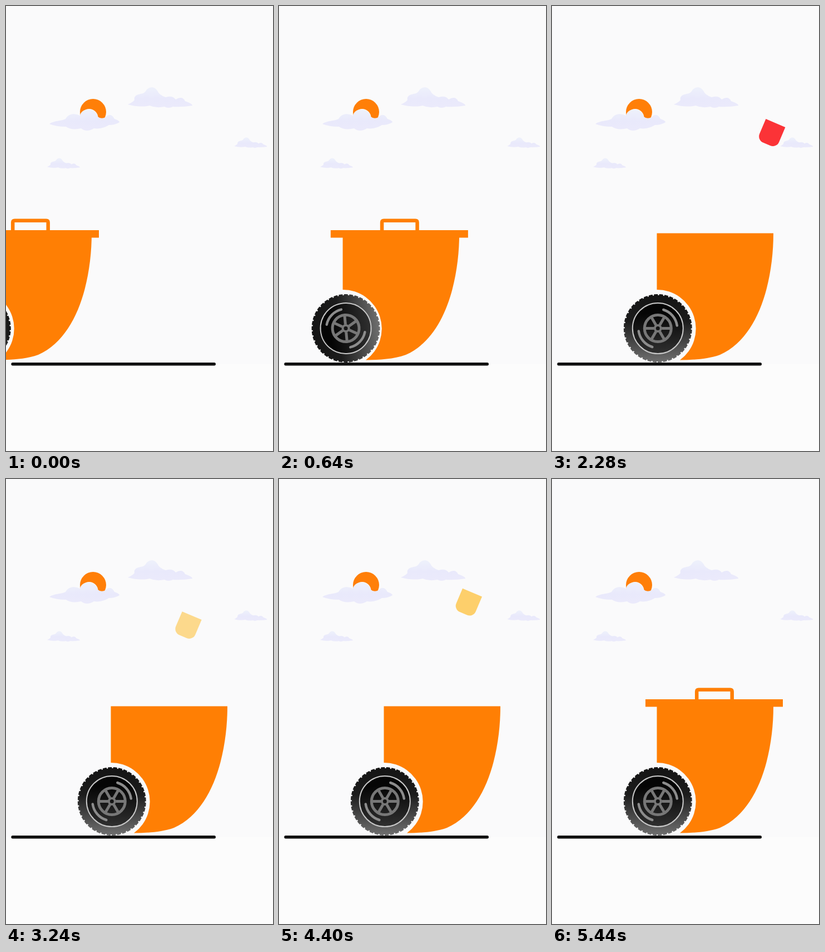
These frames come from a looping animation (480 by 800 pixels, 5.96 s). An HTML page:

```html
<!DOCTYPE html>
<html lang="en">
<head>
<meta charset="utf-8">
<title>Bin</title>
<style>
html, body { margin: 0; width: 100%; height: 100%; overflow: hidden; background: #fafafb; }
svg { display: block; width: 100%; height: 100%; }
</style>
</head>
<body>
<svg viewBox="0 0 480 800">
  <defs>
    <linearGradient id="mist" x2="0" y2="1">
      <stop offset="0" stop-color="#eef1fb"/>
      <stop offset=".55" stop-color="#e9e9fb"/>
      <stop offset="1" stop-color="#ebeafb"/>
    </linearGradient>
    <linearGradient id="tyre" x2="0" y2="1">
      <stop offset="0" stop-color="#141414"/>
      <stop offset=".4" stop-color="#1c1c1c"/>
      <stop offset="1" stop-color="#707070"/>
    </linearGradient>
    <linearGradient id="disc" x2="0" y2="1">
      <stop offset=".2" stop-color="#050505"/>
      <stop offset="1" stop-color="#303030"/>
    </linearGradient>
    <path id="cloud" fill="url(#mist)" d="M219 177Q228 173 231 169Q229 160 242 158Q250 157 253 150Q264 141 272 152Q275 160 287 164Q299 160 305 168Q317 161 322 171Q336 176 335 179Q318 182 300 181Q292 185 285 181Q270 184 258 179Q240 183 219 177Z"/>
    <path id="scrap" d="M-19-19H19V10A12 12 0 0 1 7 22H-7A12 12 0 0 1-19 10Z"/>
    <path id="spoke" d="M7 0H24"/>
  </defs>

  <rect width="480" height="800" fill="#fafafb"/>
  <rect y="644" width="480" height="156" fill="#fcfcfc"/>

  <circle cx="156.5" cy="190.5" r="23.5" fill="#ff7f08"/>
  <circle cx="149.500" cy="201" r="16" fill="#f8f9fb"/>
  <path fill="url(#mist)" d="M78 212C85 206 100 207 107 203C113 192 125 193 133 197C136 182 160 182 165 199Q171 204 179 200Q188 190 195 203Q204 206 204 209Q196 214 185 214Q172 222 158 220Q145 228 135 220Q118 224 108 217Q90 217 78 212Z"/>
  <use href="#cloud"/>
  <use href="#cloud" transform="translate(-37.300 199.300) scale(.508)"/>
  <use href="#cloud" transform="translate(299 162) scale(.508)"/>

  <g id="scraps"></g>

  <path id="body" fill="#ff7f04" d="M188.500 408.500H398C398 490 374 595 302 627C280 635 255 636 230 636.500A70 70 0 0 0 188.500 510Z"/>

  <g id="wheel" fill="none">
    <circle r="61.500" fill="url(#tyre)"/>
    <circle r="61" stroke="#fafafb" stroke-width="3" pathLength="40" stroke-dasharray=".25 .75"/>
    <circle r="45.500" fill="url(#disc)" stroke="#c8c8c8" stroke-width="2"/>
    <g stroke="#8c8c8c" stroke-width="4.500" stroke-linecap="round">
      <path id="shine" d="M10-33.500A35 35 0 0 1 34.500-5"/>
      <use href="#shine" transform="rotate(180)"/>
    </g>
    <g id="spokes" stroke="#777" stroke-width="5">
      <circle r="24"/>
      <circle r="5.500" stroke-width="4"/>
    </g>
  </g>

  <g id="lid" fill="#ff7f04">
    <rect x="168" y="396" width="247" height="13.500"/>
    <path d="M260.200 397V382Q260.200 378.700 263.500 378.700H320.500Q323.700 378.700 323.700 382V397" fill="none" stroke="#ff7f04" stroke-width="6.500"/>
  </g>

  <path d="M12 643.800H374.300" stroke="#111" stroke-width="5.500" stroke-linecap="round"/>
</svg>
<script>
const LOOP = 5960, STEP = 40;
const ORANGE = '#ff7f04', FADED = '#fc8250';
const NS = 'http://www.w3.org/2000/svg';
const byId = id => document.getElementById(id);
const [body, wheel, lid] = ['body', 'wheel', 'lid'].map(byId);
const [rim, handle] = lid.children;

function addUse(parent, href, attrs) {
  const el = document.createElementNS(NS, 'use');
  el.setAttribute('href', href);
  for (const key in attrs) el.setAttribute(key, attrs[key]);
  return parent.appendChild(el);
}

for (let a = 0; a < 360; a += 60) addUse(byId('spokes'), '#spoke', { transform: `rotate(${a})` });

const scraps = [
  { start: 2280, x: 394.5, y: 228, dx: -72, dy: 170, power: 2, fill: '#fb3337' },
  { start: 2960, x: 350, y: 188, dx: -65, dy: 210, power: 1.35, fill: '#fec850' },
  { start: 3560, x: 350, y: 180, dx: -95, dy: 215, power: 2, fill: '#fec850' },
  { start: 4160, x: 350, y: 188, dx: -62, dy: 210, power: 2, fill: '#fec850' }
].map(s => ({ ...s, el: addUse(byId('scraps'), '#scrap', { fill: s.fill }) }));

const progress = (t, start, length) => Math.min(1, Math.max(0, (t - start) / length));

function drawLid(x, y, opacity, color) {
  lid.setAttribute('transform', `translate(${x} ${y})`);
  lid.setAttribute('opacity', opacity);
  rim.setAttribute('fill', color);
  handle.setAttribute('stroke', color);
}

function draw(t) {
  const left = 1 - progress(t, 0, 960);
  const binLeft = left ** 1.087, wheelLeft = left ** 1.13;
  body.setAttribute('transform', `translate(${-244 * binLeft} 0)`);
  wheel.setAttribute('transform',
    `translate(${190.3 - 243 * wheelLeft} 579.5) rotate(${-330 * wheelLeft})`);

  if (t < 4760) {
    const open = progress(t, 1400, 480);
    drawLid(-248 * binLeft, 7 - 108 * open, 1 - open, open ? FADED : ORANGE);
  } else {
    const close = progress(t, 4720, 720);
    drawLid(0, -112 * (1 - close), close, ORANGE);
  }

  for (const s of scraps) {
    const p = progress(t, s.start, 600) ** s.power;
    s.el.setAttribute('transform', `translate(${s.x + s.dx * p} ${s.y + s.dy * p}) rotate(23)`);
    s.el.setAttribute('opacity', t < s.start ? 0 : 1 - p);
  }
}

const origin = performance.now();
function tick() {
  const t = (performance.now() - origin) % LOOP;
  draw(Math.floor(t / STEP) * STEP);
  requestAnimationFrame(tick);
}
tick();
</script>
</body>
</html>
```
